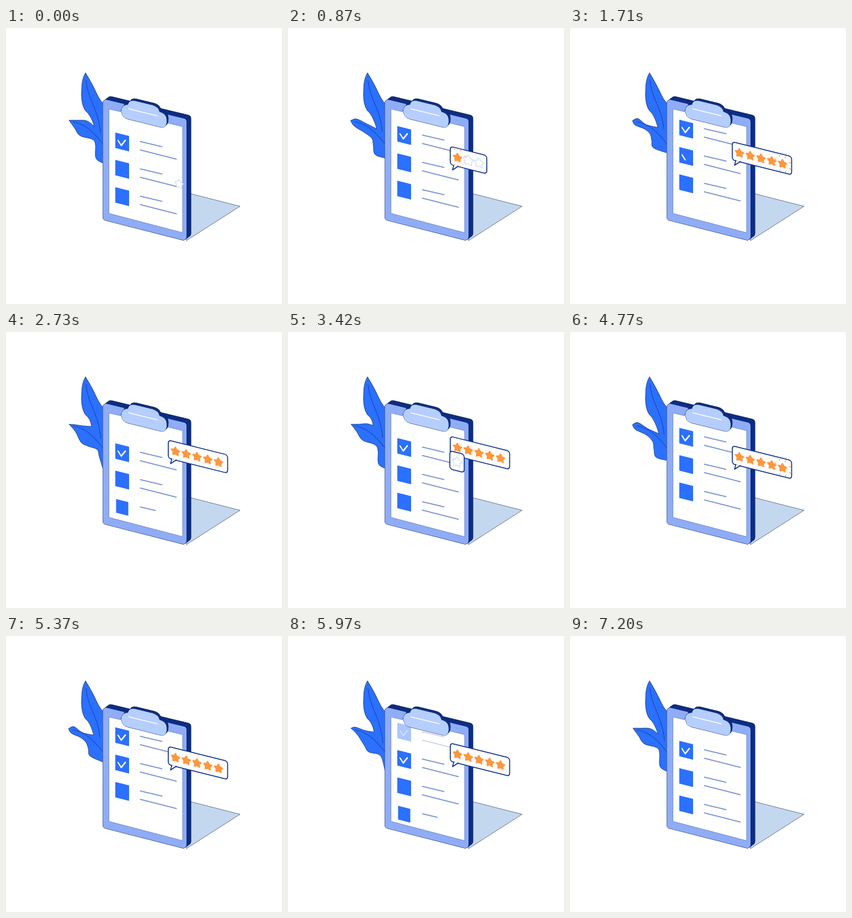
Recreate the animation shown at these times as an HTML page with a canvas. Size 500 by 500 pixels, loop 7.23 s.

```html
<!DOCTYPE html>
<html lang="en">
<head>
<meta charset="utf-8">
<title>Checklist and rating</title>
<style>
html, body { margin: 0; width: 100%; height: 100%; overflow: hidden; background: #fff; }
canvas { display: block; width: 500px; height: 500px; }
</style>
</head>
<body>
<canvas id="stage" width="500" height="500"></canvas>
<script>
const c = document.getElementById('stage').getContext('2d');
const LOOP = 7230, ROW_GAP = 49.5, SLOPE = 0.25;
const BLUE = '#2b70fe', NAVY = '#0c2d83', LINE = '#7c95d2', ORANGE = '#ff963e';
const EDGE = 'rgba(8,16,50,0.7)', FRAME = '#0f2f90';

const clamp = x => Math.max(0, Math.min(1, x));
const ramp = (t, start, length) => clamp((t - start) / length);
const outQuad = x => 1 - (1 - x) ** 2;
const inOut = x => x * x * (3 - 2 * x);
const outBack = (x, s) => 1 + (s + 1) * (x - 1) ** 3 + s * (x - 1) ** 2;

function paint(path, fill, stroke, width) {
  if (fill) { c.fillStyle = fill; c.fill(path); }
  if (stroke) { c.strokeStyle = stroke; c.lineWidth = width; c.stroke(path); }
}

// Draws in the plane of the board, with its origin at (x, y).
function onBoard(x, y, draw) {
  c.save();
  c.transform(1, SLOPE, 0, 1, x, y);
  draw();
  c.restore();
}

function box(x, y, w, h, r) {
  const p = new Path2D();
  p.roundRect(x, y, w, h, r);
  return p;
}

// Upright panel whose top and bottom edges slant by their own amounts.
function panel(x1, x2, top1, top2, bottom2, bottom1, r) {
  const p = new Path2D();
  p.moveTo((x1 + x2) / 2, (top1 + top2) / 2);
  p.arcTo(x2, top2, x2, bottom2, r);
  p.arcTo(x2, bottom2, x1, bottom1, r);
  p.arcTo(x1, bottom1, x1, top1, r);
  p.arcTo(x1, top1, x2, top2, r);
  p.closePath();
  return p;
}

function segment(x1, y1, x2, y2, color, width) {
  paint(new Path2D(`M${x1} ${y1}L${x2} ${y2}`), null, color, width);
}

function extrude(path, dx, dy, fill, stroke, width) {
  const steps = Math.ceil(dx * 2);
  for (let i = 0; i <= steps; i++) {
    c.save();
    c.translate(dx * i / steps, dy * i / steps);
    paint(path, fill, stroke, width);
    c.restore();
  }
}

function solid(path, dx, dy, fill) {
  extrude(path, dx, dy, null, '#0a1638', 1);
  extrude(path, dx, dy, NAVY);
  paint(path, fill);
}

// Lower leaf: fork, two points of the upper edge, tip, then the lower edge to the board.
const LEAF_CYCLE = LOOP / 2, TIP = 3;
const leafKeys = [
  [0, [160,178, 146,168, 128,167, 114,167, 124,181, 134,195, 157,202, 162,212, 163,236, 178,246]],
  [1155, [161,184, 141,175, 123,164, 113,168, 119,177, 139,187, 150,199, 152,212, 156,227, 178,233]],
  [1710, [159,180, 138,175, 123,164, 113,168, 118,176, 135,183, 145,192, 148,204, 151,217, 178,227]],
  [2355, [156,174, 139,171, 122,165, 114,167, 125,178, 138,198, 146,210, 165,215, 172,228, 178,258]],
  [2730, [155,171, 140,170, 126,168, 114,167, 126,181, 136,200, 149,207, 165,213, 169,226, 178,256]],
  [3420, [154,169, 142,166, 128,167, 114,167, 124,180, 135,196, 157,204, 163,215, 164,239, 178,248]]
];

function leafPoints(t) {
  const p = t % LEAF_CYCLE;
  let i = leafKeys.length - 1;
  while (leafKeys[i][0] > p) i--;
  const [start, from] = leafKeys[i];
  const [end, to] = leafKeys[i + 1] || [LEAF_CYCLE, leafKeys[0][1]];
  const f = (p - start) / (end - start);
  const pts = [];
  for (let j = 0; j < from.length; j += 2)
    pts.push([0, 1].map(k => from[j + k] + (to[j + k] - from[j + k]) * f));
  return pts;
}

function curveThrough(path, pts) {
  for (let i = 0; i < pts.length - 1; i++) {
    const a = pts[i - 1] || pts[i], b = pts[i], d = pts[i + 1], e = pts[i + 2] || d;
    path.bezierCurveTo(
      b[0] + (d[0] - a[0]) / 6, b[1] + (d[1] - a[1]) / 6,
      d[0] - (e[0] - b[0]) / 6, d[1] - (e[1] - b[1]) / 6, d[0], d[1]);
  }
}

function drawPlant(t) {
  const pts = leafPoints(t), [fx, fy] = pts[0];
  const shape = new Path2D(
    `M180 141Q172 134 166 122Q156 100 144 81Q137 93 137 110Q135 138 144 150Q153 157 ${fx} ${fy}`);
  curveThrough(shape, pts.slice(0, TIP + 1));
  curveThrough(shape, pts.slice(TIP));
  shape.closePath();
  paint(shape, BLUE, EDGE, 0.9);
  const drop = (pts[pts.length - 1][1] - 226) / 3;
  paint(new Path2D(`M145 95C148 130 167 145 ${170 + drop / 5} ${183 + drop}` +
    'M121 170C145 174 160 190 178 213'), null, '#1748b8', 1.2);
}

const board = panel(175.5, 327, 128.5, 165, 386, 347.3, 6);
const paper = panel(186.5, 320, 146.5, 178.5, 371, 336, 1);
const clipShape = new Path2D('M209 149Q210 139 221 139Q223 130 233 132L266 140' +
  'Q276 143 278 152Q291 155 291 168Q291 181 282 180L221 165Q209 162 209 149Z');

function drawBoard() {
  paint(new Path2D('M330 299L424 323L327 385Z'), '#c3d8ef', EDGE, 0.8);
  solid(board, 8, -6, '#8facf6');
  paint(paper, '#fff', LINE, 1.2);
}

function drawClip() {
  solid(clipShape, 3, -3.5, '#b6cefe');
  segment(222.5, 146.5, 274, 159, '#fff', 1.4);
}

function drawRow(k, t) {
  const born = (k % 2 ? -4730 : -8720) + LOOP * (k >> 1);
  const age = t - born;
  const alpha = 1 - ramp(age, 10500, 333);
  if (age <= 0 || !alpha) return;
  c.globalAlpha = alpha;
  onBoard(198, 189.5 + ROW_GAP * k - 2 * ROW_GAP * t / LOOP, () => {
    const s = outQuad(ramp(age, 0, 350));
    paint(box(12.5 - 12.5 * s, 14 - 14 * s, 25 * s, 28 * s, 0.5), BLUE);

    const first = ramp(age, 100, 190), second = ramp(age, 250, 250);
    if (first) segment(45.5, 5, 45.5 + 39 * first, 5 - 0.6 * first, LINE, 2);
    if (second) segment(45.5, 20.2, 45.5 + 65 * second, 20.2 + 0.3 * second, LINE, 2);

    const tick = ramp(age, 6320, 300);
    if (tick) {
      c.setLineDash([23 * tick, 30]);
      paint(new Path2D('M5 13L10.7 20.6L18.5 9'), null, '#fff', 2.4);
      c.setLineDash([]);
    }
  });
  c.globalAlpha = 1;
}

function drawStar(x, y, r, filled) {
  const p = new Path2D();
  for (let i = 0; i < 10; i++) {
    const a = i * Math.PI / 5 - Math.PI / 2, d = i % 2 ? r * 0.56 : r;
    p.lineTo(x + d * Math.cos(a), y + d * Math.sin(a));
  }
  p.closePath();
  if (filled) paint(p, ORANGE, ORANGE, 2);
  else {
    paint(p, '#fff', '#a5b8e2', 2.6);
    paint(p, '#fff', '#fff', 1.2);
  }
}

function drawSparks(x, y, f) {
  for (let i = 0; i < 8; i++) {
    const a = (i + 0.5) * Math.PI / 4;
    const r1 = 10 + 8 * f, r2 = r1 + 4 * (1 - f);
    segment(x + r1 * Math.cos(a), y + r1 * Math.sin(a),
      x + r2 * Math.cos(a), y + r2 * Math.sin(a), ORANGE, 1.3);
  }
}

function drawBubble(p) {
  const alpha = 1 - ramp(p, 3480, 270);
  if (p < 0 || !alpha) return;
  const away = 1 - outBack(ramp(p, 0, 500), 2.4);
  c.globalAlpha = alpha;
  onBoard(294 + 7 * away, 223.2 - 0.01 * p + 39.5 * away, () => {
    const pop = outQuad(ramp(p, 100, 240));
    const w = 26 + 81.5 * inOut(ramp(p, 450, 850));
    const tail = ramp(p, 500, 250);
    if (pop) {
      const frame = box(13 - 13 * pop, 16.5 - 16.5 * pop, w * pop, 33 * pop, 5 * pop);
      paint(frame, '#fff', FRAME, 1.7);
      if (tail)
        paint(new Path2D(`M6.5 32.2L${6.5 - 2.5 * tail} ${32.2 + 9.5 * tail}L14.5 32.2`),
          '#fff', FRAME, 1.6);
    }
    for (let i = 0; i < 5; i++) {
      const x = 13 + 19.5 * i, lit = 700 + 225 * i;
      const size = i ? ramp(w, x, 11) : 0.88 + 0.12 * pop;
      const bump = 1 + 0.18 * Math.sin(Math.PI * ramp(p, lit - 80, 170));
      if (size) drawStar(x, 17.3, 8 * size * bump, p >= lit);
      const f = ramp(p, lit, 300);
      if (f > 0 && f < 1) drawSparks(x, 17.3, f);
    }
  });
  c.globalAlpha = 1;
}

function render(now) {
  const t = now % LOOP;
  c.fillStyle = '#fff';
  c.fillRect(0, 0, 500, 500);
  c.lineCap = c.lineJoin = 'round';
  drawPlant(t);
  drawBoard();
  for (let k = 0; k < 5; k++) drawRow(k, t);
  drawClip();
  drawBubble(t);
  drawBubble(t - 3060);
}

const began = performance.now();
function tick() {
  render(performance.now() - began);
  requestAnimationFrame(tick);
}
tick();
</script>
</body>
</html>
```
